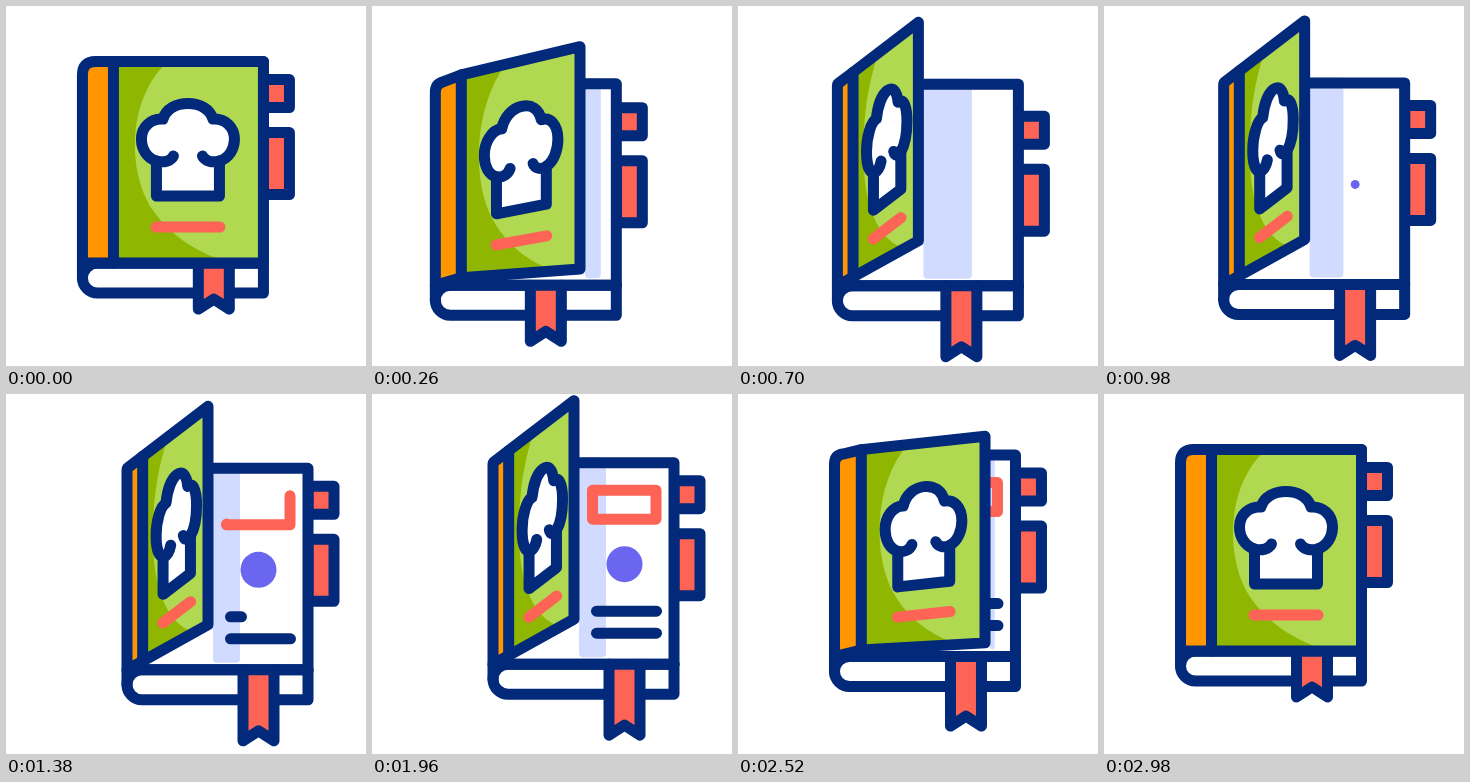
Recreate the animation shown at these times as an HTML page. Size 360x360 px, loop 3 s.

```html
<!DOCTYPE html>
<html lang="en">
<head>
<meta charset="utf-8">
<title>Recipe book</title>
<style>
  html, body { margin: 0; width: 100%; height: 100%; overflow: hidden; background: #fff; }
  svg { display: block; width: 100vw; height: 100vh; }
  .ink { stroke: #02297a; stroke-width: 11; stroke-linecap: round; stroke-linejoin: round; fill: none; }
  .white { fill: #fff; }
  .red { fill: #fd6456; }
  .orange { fill: #ff9600; }
  .dark { fill: #8fb600; }
  .light { fill: #b0d850; }
  .shade { fill: #d1dbff; }
  .dot { fill: #6a66f0; }
  .rose { stroke: #fd6456; }
</style>
</head>
<body>
<svg viewBox="0 0 360 360">
  <g id="book">
    <g id="tabs" class="ink">
      <path class="red" d="M257.5 73.5H283.5V101.5H257.5Z"/>
      <path class="red" d="M257.5 126.5H283.5V188.5H257.5Z"/>
    </g>
    <path class="white" d="M82 55.5H257.5V257H82Z"/>
    <rect id="shade" class="shade" y="50" height="200" rx="4"/>
    <circle id="dot" class="dot" cx="208" cy="157"/>
    <g class="ink">
      <path id="box" class="rose" pathLength="1" d="M239.5 83V112H176V83Z"/>
      <path id="line1" pathLength="1" d="M180 204H240"/>
      <path id="line2" pathLength="1" d="M180 226H240"/>
      <path d="M107.5 55.5H257.5V257"/>
      <path class="white" d="M257.5 257H91.5A15 15 0 0 0 91.5 287H257.5Z"/>
      <path id="ribbon" class="red"/>
      <path d="M91.5 257H257.5"/>
    </g>
  </g>
  <g id="cover">
    <path id="spine" class="orange"/>
    <path class="dark" data-d="M107.5 55.5 L257.5 55.5 L257.5 257 L107.5 257 Z"/>
    <path class="light" data-d="M162 55.5 C121 92 121 165 146 203 C163 228 190 247 225 257 L257.5 257 L257.5 55.5 Z"/>
    <g class="ink">
      <g id="print">
        <path class="white" data-d="M150.5 190 L150.5 155 C141 152 135.5 143 135.5 133 C135.5 121 145 112 157 113 C160 103 170 97.5 182 97.5 C194 97.5 204 103 207 113 C219 112 228.5 121 228.5 133 C228.5 143 223 152 213.5 155 L213.5 190 Z"/>
        <path data-d="M150.5 155 C158 157 165 155 167.5 150 M213.5 155 C206 157 199 155 196.5 150"/>
        <path class="rose" data-d="M150 221 L214 221"/>
      </g>
      <path data-d="M107.5 55.5 L107.5 257"/>
      <path id="rim"/>
      <path d="M76.5 257V272"/>
    </g>
  </g>
</svg>
<script>
const LOOP = 3000, LEFT = 76.5, TOP = 55.5, WIDTH = 181, HEIGHT = 201.5;
const $ = id => document.getElementById(id);
const mapped = [...document.querySelectorAll('[data-d]')];

// Progress of t from a to b, plain and eased
const clamp = v => Math.min(1, Math.max(0, v));
const span = (t, a, b) => clamp((t - a) / (b - a));
const smooth = (t, a, b) => { const s = span(t, a, b); return s * s * (3 - 2 * s); };
const easeOut = (t, a, b) => Math.sin(span(t, a, b) * Math.PI / 2);
const arch = (t, a, b) => Math.sin(span(t, a, b) * Math.PI);

function pose(t) {
  const shut = 1 - smooth(t, 2160, 2730);
  const open = smooth(t, 0, 640) * shut;
  const swell = arch(t, 0, 1200) ** 2;
  return {
    open,
    width: WIDTH - 100 * open,
    up: 62 * easeOut(t, 0, 640) * shut,
    low: 45 * open,
    x: 44.5 * smooth(t, 300, 1060) * (1 - smooth(t, 2270, 2740)) - 14.5 * arch(t, 0, 720),
    y: 24 * easeOut(t, 0, 340) * (1 - span(t, 0, 2860) ** 2.1),
    tabY: 15 * swell,
    shade: 32 * open + 23 * swell,
    ribbonX: -21 * easeOut(t, 0, 260) * (1 - smooth(t, 260, 1000)),
    ribbonY: 25 * smooth(t, 0, 600) * (1 - smooth(t, 2440, 2970)),
  };
}

// Maps a point of the closed cover onto the turned one
function turn({ open, width, up, low }, x, y, print) {
  const flat = (x - LEFT) / WIDTH, depth = .16 * open;
  const u = flat * (1 + depth) / (1 + depth * flat);
  let v = (y - TOP) / HEIGHT, top = TOP - up * u, tall = HEIGHT;
  if (print) {
    // The print keeps nearly one height and sags a little
    v += .06 * open * Math.sin(Math.PI * clamp((v - .2) / .8));
    tall += (up - low) * (u + (.6 - u) * open);
  } else {
    const bend = u > .1 ? 24 * open * (1 - open) * (1 - u) : 0;
    tall += (up - low) * u - bend / 2;
    top -= bend / 2;
  }
  return `${(LEFT + width * u).toFixed(2)} ${(top + tall * v).toFixed(2)}`;
}

function trim(id, amount) {
  $(id).style.visibility = amount > 0 ? 'visible' : 'hidden';
  $(id).setAttribute('stroke-dasharray', `${amount} 2`);
}

function draw(t) {
  const p = pose(t);
  const warp = (d, print) => d.replace(/([\d.]+) ([\d.]+)/g, (m, x, y) => turn(p, +x, +y, print));
  const move = `translate(${p.x} ${p.y})`;
  $('book').setAttribute('transform', move);
  $('cover').setAttribute('transform', move);
  $('tabs').setAttribute('transform', `translate(0 ${p.tabY})`);

  const mid = 208 + p.ribbonX, tip = 303 + p.ribbonY;
  $('ribbon').setAttribute('d',
    `M${mid - 15.5} 257V${tip}L${mid} ${tip - 10}L${mid + 15.5} ${tip}V257`);

  $('shade').setAttribute('x', LEFT + p.width + 5);
  $('shade').setAttribute('width', Math.max(0, p.shade - 5));
  $('dot').setAttribute('r', 18 * smooth(t, 900, 1150));
  trim('line2', smooth(t, 1050, 1330));
  trim('box', smooth(t, 1200, 1560));
  trim('line1', smooth(t, 1310, 1570));

  mapped.forEach(el => el.setAttribute('d', warp(el.dataset.d, el.parentNode.id === 'print')));
  const r = 13 * (1 - .85 * p.open);
  const corner = `M${LEFT} 257 L${LEFT} ${TOP + r} Q${LEFT} ${TOP} ${LEFT + r} ${TOP} L107.5 ${TOP} `;
  $('spine').setAttribute('d', warp(corner + 'L107.5 257 Z'));
  $('rim').setAttribute('d', warp(corner + `L257.5 ${TOP} L257.5 257 L107.5 257 Z`));
}

const start = performance.now();
function tick() {
  draw((performance.now() - start) % LOOP);
  requestAnimationFrame(tick);
}
tick();
</script>
</body>
</html>
```
